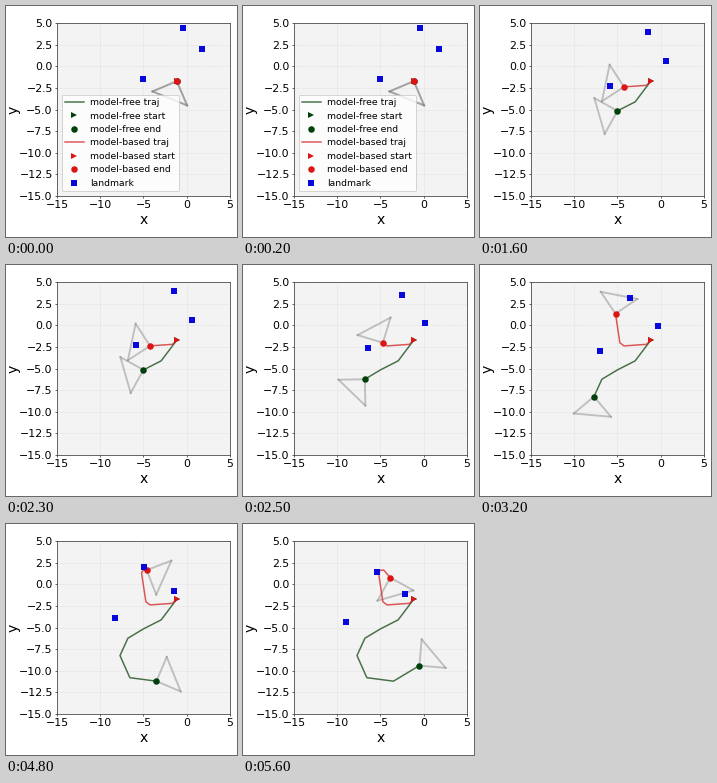
These frames come from a looping animation (231 by 231 pixels, 6300 ms). A matplotlib script:

```python
import matplotlib.pyplot as plt
import numpy as np
from matplotlib.animation import FuncAnimation

SIZE, DPI = 231, 72          # at 72 dpi one point equals one pixel
FRAMES, INTERVAL = 63, 100
STEPS = 8
START, START_HEADING = (-1.15, -1.72), 248
REACH = 3.05                 # side length of the field of view


def drive(speeds, turns):
    """Unicycle model: each move follows the mean of the old and new heading."""
    headings = START_HEADING + np.cumsum([0, *turns])
    course = np.radians((headings[:-1] + headings[1:]) / 2)
    moves = np.column_stack([np.cos(course), np.sin(course)])
    moves *= np.array(speeds)[:, None]
    return np.cumsum([START, *moves], axis=0), headings


def drift(xs, ys):
    """Landmark positions at every step, from four key points."""
    keys, steps = (0, 2, 5, 7), np.arange(STEPS)
    return np.column_stack([np.interp(steps, keys, xs), np.interp(steps, keys, ys)])


FREE = drive([3.0, 2.3, 2.1, 2.2, 2.8, 3.1, 3.5], [-30, -22, 30, 39, 58, 59, 18])
BASED = drive([.7, 2.6, .6, 3.4, .35, .4, 1.15], [-48, -32, -50, -39, -50, -53, -50])
LANDMARKS = np.array([
    drift([-.4, -1.5, -4.5, -5.36], [4.43, 3.95, 2.73, 1.36]),
    drift([1.76, .55, -.73, -2.13], [1.99, .61, -.43, -1.18]),
    drift([-5.0, -5.87, -7.66, -8.94], [-1.52, -2.27, -3.3, -4.4]),
])

fig = plt.figure(figsize=(SIZE / DPI, SIZE / DPI), dpi=DPI, facecolor="white")
ax = fig.add_axes([51 / SIZE, 41 / SIZE, 173 / SIZE, 173 / SIZE],
                  facecolor="#f3f3f3")
ax.set(xlim=(-15, 5), ylim=(-15, 5),
       xticks=np.arange(-15, 6, 5), yticks=np.arange(-15, 5.1, 2.5))
ax.tick_params(labelsize=11, length=2.2, width=0.6, pad=2)
ax.grid(color="#dcdcdc", linestyle="--", linewidth=0.5)
ax.set_axisbelow(True)
for spine in ax.spines.values():
    spine.set(linewidth=0.8, color="#444444")
label_style = dict(size=14, ha="center", va="center")
fig.text(138 / SIZE, 17.5 / SIZE, "x", **label_style)
fig.text(7.5 / SIZE, 127 / SIZE, "y", rotation=90, **label_style)


def view_sides():
    return [ax.plot([], [], color="gray", alpha=0.45, lw=1.9, zorder=2)[0]
            for _ in range(3)]


def marker(shape, color, size, label, zorder):
    return ax.plot([], [], shape, color=color, ms=size, mew=0,
                   label=label, zorder=zorder)[0]


def robot(name, line_color, color, zorder):
    path, = ax.plot([], [], color=line_color, alpha=0.75, lw=1.5,
                    label=f"{name} traj", zorder=zorder)
    start = marker(">", color, 6.8, f"{name} start", zorder + 1)
    end = marker("o", color, 6.5, f"{name} end", zorder + 2)
    return path, start, end, view_sides()


free = robot("model-free", "#0f460f", "#00400a", 3)
based = robot("model-based", "#d42020", "#dc1414", 6)
squares = marker("s", "#0808dc", 5.2, "landmark", 9)
legend = ax.legend(loc="lower left", fontsize=9.2, labelspacing=0.48,
                   handletextpad=0.7, framealpha=0.8)
legend.set_zorder(10)


def place(parts, route, step):
    path, start, end, sides = parts
    track, headings = route
    path.set_data(*track[:step + 1].T)
    start.set_data(*track[:1].T)
    end.set_data(*track[step:step + 1].T)
    angles = np.radians(headings[step] + np.array([45, -45]))
    tips = track[step] + REACH * np.column_stack([np.cos(angles), np.sin(angles)])
    corners = [track[step], *tips, track[step]]
    for side, a, b in zip(sides, corners, corners[1:]):
        side.set_data([a[0], b[0]], [a[1], b[1]])


def draw(frame):
    step = int((frame + 0.5) * STEPS / FRAMES)
    place(free, FREE, step)
    place(based, BASED, step)
    squares.set_data(*LANDMARKS[:, step].T)
    legend.set_visible(step == 0)
    return []


anim = FuncAnimation(fig, draw, frames=FRAMES, interval=INTERVAL,
                     repeat=True, repeat_delay=0, blit=False)
plt.show()
```
